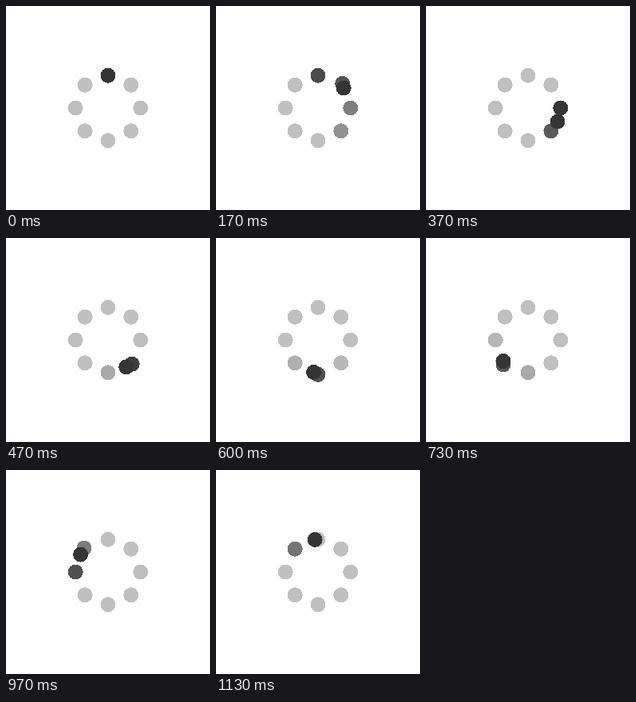
An HTML page that plays this animation: 256x256 px, repeating every 1160 ms.

```html
<!DOCTYPE html>
<html lang="en">
<head>
<meta charset="utf-8">
<title>Loading spinner</title>
<style>
  html, body { margin: 0; width: 100%; height: 100%; overflow: hidden; background: #fefefe; }
  svg { display: block; width: 100vw; height: 100vh; }
</style>
</head>
<body>
<svg id="stage" viewBox="0 0 256 256" shape-rendering="crispEdges"></svg>
<script>
  const LOOP = 1160, CENTER = 128, RING = 40.8, DOT = 9.5, COUNT = 8;
  const LIGHT = 192, DARK = 53;
  const GAP = 360 / COUNT, TURN = 10.43; // degrees between dots, degrees per step
  const PUSH = 4, PUSH_SPAN = 2;

  // Fade of a dot, in steps around the moment the runner passes it
  const LEAD = 4.3, FULL = 2, HOLD = 2.6, END = 5.2;

  const stage = document.getElementById('stage');
  const clamp = v => Math.max(0, Math.min(1, v));

  function addDot() {
    const c = document.createElementNS('http://www.w3.org/2000/svg', 'circle');
    c.setAttribute('r', DOT);
    return stage.appendChild(c);
  }

  function place(c, degrees, radius, gray) {
    const a = degrees * Math.PI / 180;
    c.setAttribute('cx', CENTER + radius * Math.sin(a));
    c.setAttribute('cy', CENTER - radius * Math.cos(a));
    c.setAttribute('fill', `rgb(${gray},${gray},${gray})`);
  }

  const ring = Array.from({ length: COUNT }, addDot);
  const runner = addDot();

  function drawRingDot(c, i, n) {
    const pass = Math.max(PUSH_SPAN, i * GAP / TURN);
    // The first half of the ring darkens from the start, the rest on approach
    const start = i < COUNT / 2 ? 0 : pass - LEAD;
    const rise = clamp((n - start) / (pass + FULL - start));
    const fall = clamp((pass + END - n) / (END - HOLD));
    const gray = Math.round(LIGHT + (DARK - LIGHT) * Math.min(rise, fall));
    const push = PUSH * clamp(1 - Math.abs(n - pass) / PUSH_SPAN);
    place(c, i * GAP, RING + push, gray);
  }

  function draw(ms) {
    // 30 steps per second, on a 10 ms clock
    const n = Math.floor((Math.floor(ms / 10) + 0.4) * 0.3);
    ring.forEach((c, i) => drawRingDot(c, i, n));
    place(runner, n * TURN, RING, DARK);
  }

  function tick() {
    draw(performance.now() % LOOP);
    requestAnimationFrame(tick);
  }
  tick();
</script>
</body>
</html>
```
